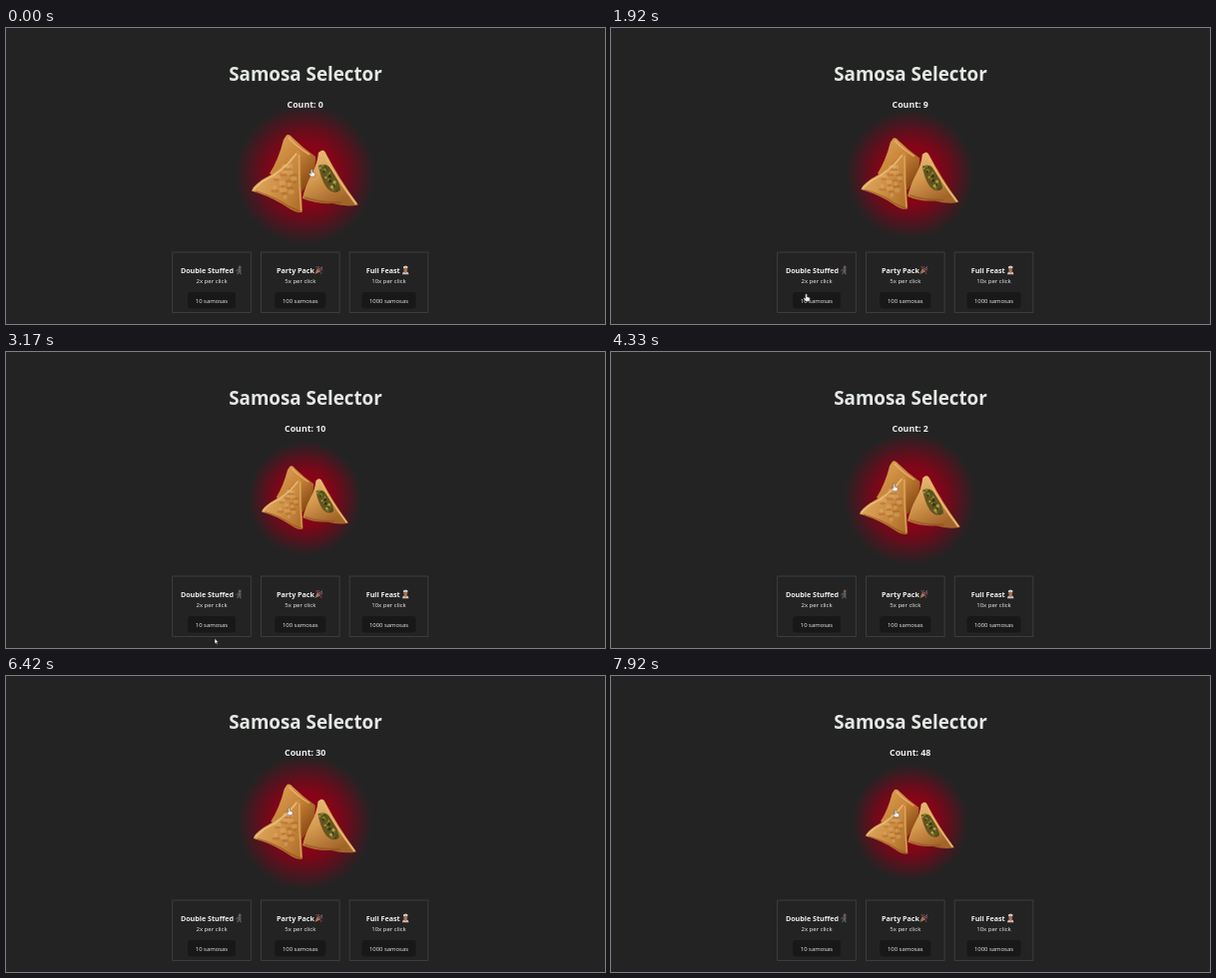
An HTML page that plays this animation: 600x297 px, repeating every 8000 ms.

```html
<!DOCTYPE html>
<html lang="en">
<head>
<meta charset="utf-8">
<title>Samosa Selector</title>
<style>
html, body { margin: 0; width: 100%; height: 100%; overflow: hidden; background: #242324; }
svg { display: block; width: 100vw; height: 100vh; }
text { font-family: "Open Sans", "Noto Sans", sans-serif; fill: #efefef; text-anchor: middle; }
.bold { font-weight: 700; }
</style>
</head>
<body>
<svg viewBox="0 0 600 297">
  <defs>
    <radialGradient id="glow">
      <stop offset="0" stop-color="#960016" stop-opacity=".97"/>
      <stop offset=".45" stop-color="#920016" stop-opacity=".88"/>
      <stop offset=".65" stop-color="#8c0016" stop-opacity=".63"/>
      <stop offset=".83" stop-color="#880018" stop-opacity=".3"/>
      <stop offset="1" stop-color="#800018" stop-opacity="0"/>
    </radialGradient>
    <linearGradient id="front" x1="0" y1=".2" x2="1" y2=".8">
      <stop offset="0" stop-color="#e3b069"/>
      <stop offset=".55" stop-color="#cf9045"/>
      <stop offset="1" stop-color="#b06f2b"/>
    </linearGradient>
    <linearGradient id="side" x1="0" y1="0" x2=".5" y2="1">
      <stop offset="0" stop-color="#ecc382"/>
      <stop offset=".5" stop-color="#d59a50"/>
      <stop offset="1" stop-color="#a3642a"/>
    </linearGradient>
    <linearGradient id="back" x1="0" y1="0" x2=".8" y2="1">
      <stop offset="0" stop-color="#e0a75b"/>
      <stop offset=".5" stop-color="#c88339"/>
      <stop offset="1" stop-color="#83440f"/>
    </linearGradient>
  </defs>
  <rect width="600" height="297" fill="#242324"/>
  <text class="bold" x="300" y="52.6" font-size="18.8" style="fill:#e3e8e3">Samosa Selector</text>
  <text class="bold" id="count" x="299.7" y="79.9" font-size="8.8"></text>

  <g id="samosa">
    <circle cy="1" r="70" fill="url(#glow)"/>
    <g transform="translate(-299.5 -146)">
      <path d="M281 107.5Q284 106 287 110Q297 120 310 129Q311 136 306 150L297 164L264 146Q273 132 278 112Z" fill="url(#back)"/>
      <path d="M283 110Q291 119 304 127" fill="none" stroke="#efc078" stroke-width="1.6" opacity=".7"/>
      <path d="M316 123Q319 122 321 127Q333 150 353 177.5Q341 180 327 176Q311 177 297 171Q299 160 306 147Q312 136 313 125Z" fill="url(#side)"/>
      <path d="M313 138Q322 135 326 142Q334 152 335 163Q328 168 321 160Q315 151 313 138Z" fill="#6a5420"/>
      <g id="filling"></g>
      <path d="M317 124Q329 148 351 177" fill="none" stroke="#e6b56c" stroke-width="2.2"/>
      <path d="M299 170Q316 176 336 175" fill="none" stroke="#8d501c" stroke-width="2" opacity=".55"/>
      <path d="M291 124Q294 121 295 128Q295 156 297 184.500Q292 187 282 180Q266 169 246 163.500Q247 159 257 152Q277 142 291 124Z" fill="url(#front)"/>
      <g id="blisters"></g>
      <path d="M291 126Q278 144 257 154L248 162" fill="none" stroke="#efc682" stroke-width="1.6" opacity=".8"/>
      <path d="M293.500 127Q293 155 295.500 183" fill="none" stroke="#e9b76c" stroke-width="1.4" opacity=".7"/>
      <path d="M250 164Q269 169 283 179L294 184" fill="none" stroke="#8c4c18" stroke-width="1.4" opacity=".6"/>
    </g>
  </g>

  <g id="cards"></g>
  <g id="cursor" stroke-linejoin="round">
    <path id="hand" transform="scale(.9)" d="M-.8 0Q.2-.8 1 .3V3L3.6 3.8Q4.5 4.2 4.2 5.4L3.500 8H-.6L-2.800 5.1Q-2.900 4-1.700 4.200L-.8 5Z" fill="#f4f1ee" stroke="#444" stroke-width=".5"/>
    <path id="arrow" d="M0 0V5.200L1.200 4.200L2 6L3 5.500L2.100 3.800H3.800Z" fill="#fff" stroke="#111" stroke-width=".45"/>
  </g>
</svg>
<script>
const LOOP = 8000;
const $ = id => document.getElementById(id);

const icons = [
  `<circle cx="1" cy="-3" r="1.5" fill="#7a5a44"/>
   <path d="M-.2-1.700L2.400-1.300L2 1.600L2.400 4.200H1.200L.5 2L-1 4.200H-2.200L-.7 1Z" fill="#56606c"/>
   <path d="M-.5-1.400L-2.600 1.200" stroke="#8d6a4e" fill="none"/>`,
  `<path d="M-3.800 4L-1.400-1.800L1.800 1.500Z" fill="#a9764a"/>
   <path d="M-1.400-1.800Q1-1.200 1.800 1.500" stroke="#7c4a7a" fill="none"/>
   <path d="M0-1Q-1-3 .5-4M1.200 0Q3-1 4 .3" stroke="#b0455c" fill="none"/>
   <path d="M.8-1L3.500-3.600" stroke="#6a78b0"/>
   <path d="M-2.500-3.200h1M2.800-1.800h1M2 3h1" stroke="#b98a4a"/>`,
  `<path d="M-2-1.800Q-3-4.200-1-4Q0-5 1.200-4Q3-4.200 2-1.800Z" fill="#dcd4cc"/>
   <circle cy="-.6" r="1.900" fill="#a87052"/>
   <path d="M-3.200 4.200Q-3 1 0 1.200Q3 1 3.200 4.200Z" fill="#cbbdb4"/>
   <path d="M-1 1.300L0 2.500L1 1.300" stroke="#b54845" fill="none"/>`
];

const cards = [
  ["Double Stuffed", 2, 10, 206, 201.5, 233.2, 48],
  ["Party Pack", 5, 100, 294.8, 290, 313.2, 51],
  ["Full Feast", 10, 1000, 383.5, 377.7, 400.2, 54]
];
$("cards").innerHTML = cards.map(([name, gain, cost, x, nameX, iconX, w], i) => `
  <rect x="${x - 39.3}" y="225" width="78.6" height="60.4" fill="none" stroke="#434244" stroke-width=".8"/>
  <text class="bold" x="${nameX}" y="245.5" font-size="7.15">${name}</text>
  <g transform="translate(${iconX} 243)" stroke-width=".9">${icons[i]}</g>
  <text x="${x}" y="255.8" font-size="6">${gain}x per click</text>
  <rect x="${x - w / 2}" y="265" width="${w}" height="16.6" rx="3" fill="#191819"/>
  <text x="${x}" y="275.8" font-size="5.9">${cost} samosas</text>`).join("");

// Peas and herbs scattered down the open side
const greens = ["#7d8a2c", "#2f3b12", "#a3a044", "#465a18"];
$("filling").innerHTML = Array.from({ length: 22 }, (_, i) => {
  const y = 138 + i * 1.2;
  const x = 317 + (y - 138) * .55 + 3.5 * Math.sin(i * 2.4);
  return `<circle cx="${x}" cy="${y}" r="${1.3 + .5 * Math.sin(i * 5)}" fill="${greens[i % 4]}"/>`;
}).join("");

// Soft fried patches, alternating dark and light, inside the front face
$("blisters").innerHTML = Array.from({ length: 24 }, (_, i) => {
  const down = .3 + .6 * (i * .618 % 1), across = .1 + .75 * (i * .414 % 1);
  const x = 292 - 40 * down + across * 42 * down;
  const y = 124 + 39 * down + across * 20 * down;
  return `<ellipse cx="${x}" cy="${y}" rx="${2 + i % 3}" ry="${1.6 + i % 2}" opacity=".25"
    fill="${i % 2 ? "#f2c988" : "#8c4a14"}"/>`;
}).join("");

// Linear interpolation over [time, value, ...] rows
function track(rows, t, k = 1) {
  const i = rows.findIndex(r => r[0] > t);
  if (i < 0) return rows[rows.length - 1][k];
  if (i === 0) return rows[0][k];
  const a = rows[i - 1], b = rows[i];
  return a[k] + (b[k] - a[k]) * (t - a[0]) / (b[0] - a[0]);
}

// Pulse phase in degrees: 0 is full size, 180 is smallest
const phase = [[0, 0], [1920, 279], [3170, 509], [4330, 656], [5580, 840], [6420, 1030], [7920, 1213], [8000, 1224]];
const path = [
  [0, 306, 142], [1400, 306, 142], [1670, 229, 242], [1900, 195.5, 267], [2150, 195.5, 268],
  [2640, 285, 150], [2800, 285, 150], [3100, 209, 287.5], [3300, 209, 287.5], [3480, 204, 271],
  [3700, 204, 271], [4130, 283.5, 132.5], [4400, 283.5, 132.5], [5580, 285, 134.5],
  [6420, 283.5, 132.5], [7920, 285, 134.5]
];
const clicks = [[4260, 1], [5520, 10], [6350, 15], [7870, 24], [8040, 25]];

function countAt(t) {
  if (t < 2720) return Math.min(9, Math.floor(t / 150));
  if (t < 3580) return 10;
  return t < 4260 ? 0 : 2 * Math.floor(track(clicks, t) + 1e-6);
}

function render(t) {
  const scale = .9 + .1 * Math.cos(track(phase, t) * Math.PI / 180);
  $("samosa").setAttribute("transform", `translate(299.5 146) scale(${scale})`);
  $("count").textContent = `Count: ${countAt(t)}`;

  const x = track(path, t, 1), y = track(path, t, 2);
  const onSamosa = Math.hypot(x - 299.5, y - 146) < 54 * scale;
  const onButton = Math.abs(x - 206) < 24 && y > 265 && y < 281.6;
  const pointing = onSamosa || onButton;
  $("cursor").setAttribute("transform", `translate(${x} ${y})`);
  $("hand").style.display = pointing ? "" : "none";
  $("arrow").style.display = pointing ? "none" : "";
}

const start = performance.now();
function tick() {
  render((performance.now() - start) % LOOP);
  requestAnimationFrame(tick);
}
render(0);
requestAnimationFrame(tick);
</script>
</body>
</html>
```
